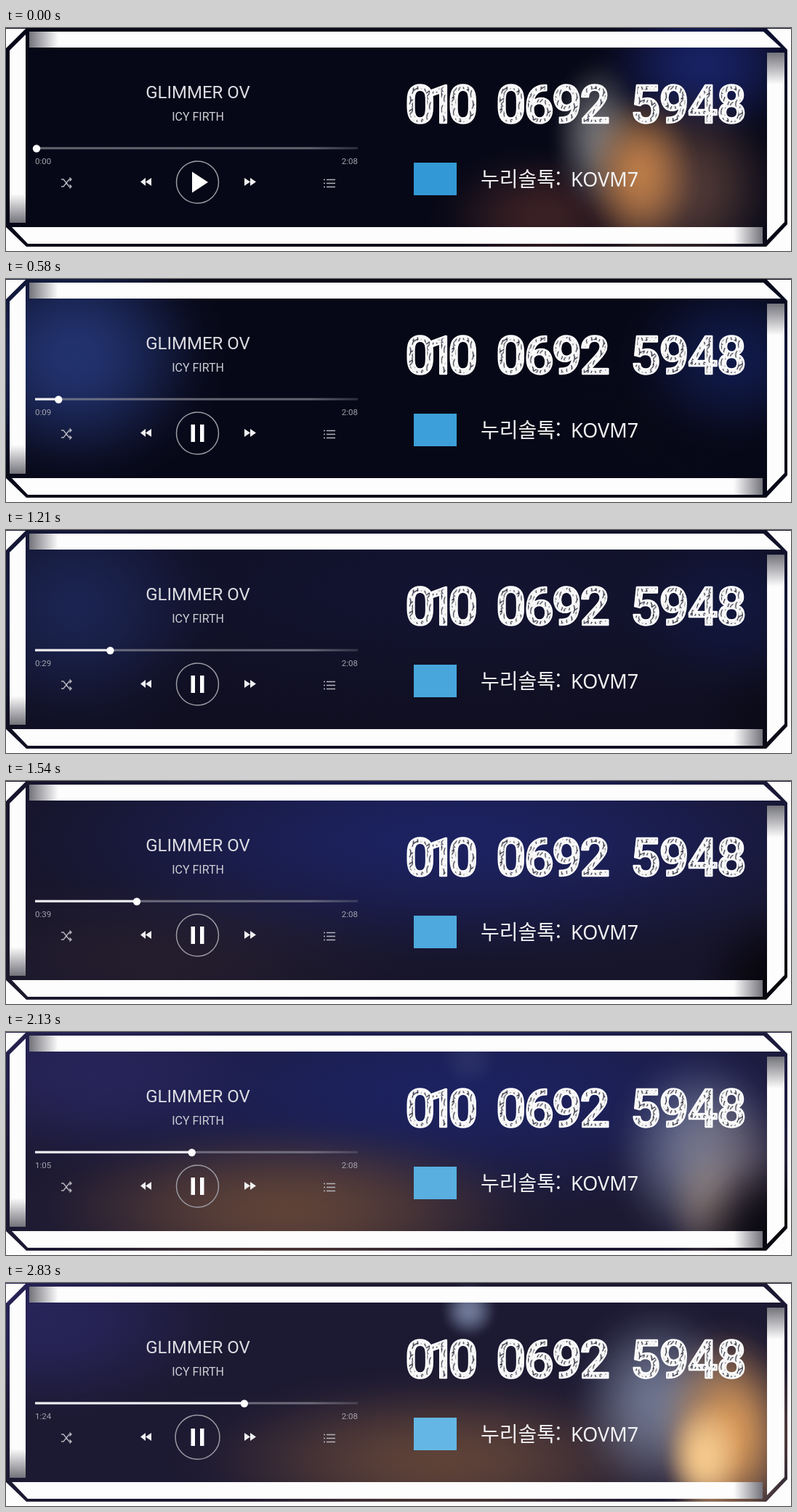
Recreate the animation shown at these times as an HTML page with a canvas. Size 1080 by 308 pixels, loop 2870 ms.

```html
<!DOCTYPE html>
<html lang="ko">
<head>
<meta charset="utf-8">
<title>Player banner</title>
<style>
  html, body { margin: 0; width: 100%; height: 100%; overflow: hidden; background: #fdfdfd; }
  canvas, svg { position: absolute; left: 0; top: 0; width: 1080px; height: 308px; }
  text { font-family: Roboto, sans-serif; }
  .title { font-size: 24px; fill: #dcdce2; text-anchor: middle; }
  .sub { font-size: 16px; fill: #cfcfd6; text-anchor: middle; }
  .time { font-size: 11.5px; fill: #a3a3ad; }
  .phone { font: 500 73px Roboto, sans-serif; fill: url(#scribble);
           stroke: #fff; stroke-width: 2.5; stroke-linejoin: round; }
  .contact { font: 500 28px "Noto Sans CJK KR", "Noto Sans CJK JP", "Noto Sans CJK", sans-serif; fill: #f2f2f4; }
  .handle { font: 500 27px "Noto Sans", sans-serif; fill: #f2f2f4; }
  .icon { fill: none; stroke: #b4b4bc; stroke-width: 1.4; }
</style>
</head>
<body>
<canvas id="glow" width="1080" height="308"></canvas>
<svg viewBox="0 0 1080 308">
  <defs>
    <pattern id="scribble" width="17" height="15" patternUnits="userSpaceOnUse" patternTransform="rotate(14)">
      <rect width="17" height="15" fill="#f6f6f6"/>
      <path d="M1 2Q5 6 3 13M7 0Q11 5 8 9T10 15M14 3Q12 8 15 13M4 8L9 3" fill="none" stroke="#1a1b2c" stroke-width="1.1"/>
    </pattern>
    <linearGradient id="toRight"><stop stop-color="#50505a" stop-opacity=".8"/><stop offset="1" stop-color="#50505a" stop-opacity="0"/></linearGradient>
    <linearGradient id="toLeft" href="#toRight" x1="1" x2="0"/>
    <linearGradient id="toDown" href="#toRight" x1="0" y1="0" x2="0" y2="1"/>
    <linearGradient id="toUp" href="#toRight" x1="0" y1="1" x2="0" y2="0"/>
    <linearGradient id="track"><stop offset=".85" stop-color="#8c8c98"/><stop offset="1" stop-color="#8c8c98" stop-opacity=".4"/></linearGradient>
  </defs>

  <!-- bevelled frame: the moving backdrop shows in the gaps -->
  <g fill="#fdfdfd">
    <path d="M0 1H27L0 28ZM1047 1H1080V308H0V275L28 302H1046L1075 271V30Z"/>
    <path d="M32 5H1042L1066 27H32Z"/>
    <path d="M1047 34H1071V268L1047 293Z"/>
    <path d="M8 275H1041V298H30Z"/>
    <path d="M5 31L27 9V269H5Z"/>
  </g>
  <rect x="32" y="5" width="40" height="22" fill="url(#toRight)"/>
  <rect x="1047" y="34" width="24" height="44" fill="url(#toDown)"/>
  <rect x="1001" y="275" width="40" height="23" fill="url(#toLeft)"/>
  <rect x="5" y="229" width="22" height="40" fill="url(#toUp)"/>

  <text class="title" x="264" y="97">GLIMMER OV</text>
  <text class="sub" x="264" y="127.500">ICY FIRTH</text>

  <rect x="40" y="164.500" width="444" height="3" fill="url(#track)" opacity=".7"/>
  <rect id="played" x="40" y="164.500" height="3" fill="#f0f0f4"/>
  <circle id="knob" cy="166.500" r="5.200" fill="#fff"/>
  <text class="time" id="clock" x="40" y="188">0:00</text>
  <text class="time" x="484" y="188" text-anchor="end">2:08</text>

  <path class="icon" d="M76 209H79L87 219H90M76 219H79L87 209H90M87.500 206.500L90 209L87.500 211.500M87.500 216.500L90 219L87.500 221.500"/>
  <path fill="#f0f0f2" d="M192 207V218L185 212.500ZM200 207V218L192 212.500ZM328 207V218L336 212.500ZM336 207V218L344 212.500Z"/>
  <path class="icon" d="M437 209.500H439M441 209.500H453M437 214.500H439M441 214.500H453M437 219.500H439M441 219.500H453"/>
  <circle id="ring" cx="263.500" cy="213" fill="none" stroke="#9a9aa2" stroke-width="1.5"/>
  <path id="play" fill="#fff" d="M256 198.500V227.500L278 213Z"/>
  <path id="pause" fill="#fff" d="M254.500 201H260V225H254.500ZM267 201H272.500V225H267Z"/>

  <g class="phone">
    <text class="phone" x="549" y="130.500" letter-spacing="-12">010</text>
    <text class="phone" x="674" y="130.500" letter-spacing="-3">0692</text>
    <text class="phone" x="859" y="130.500" letter-spacing="-2">5948</text>
  </g>
  <rect id="badge" x="561" y="186" width="59" height="45"/>
  <text class="contact" x="653" y="219">누리솔톡:</text>
  <text class="handle" x="777" y="218.500">KOVM7</text>
</svg>
<script>
const LOOP = 2870, FRAMES = 69, STEP = LOOP / FRAMES;
const PRESS = 330, END = 2830;
const $ = id => document.getElementById(id);
const ctx = $('glow').getContext('2d');

// Each scene swells around its peak; lights are colour, x, y, rx, ry
const scenes = [
  { peak: 0, span: 600, drift: 0, lights: [
    ['#182162', 960, 50, 160, 120],
    ['#3a2024', 740, 260, 160, 100],
    ['#523a36', 930, 220, 150, 150],
    ['#6a6a70', 815, 150, 70, 115],
    ['#b87a48', 872, 202, 85, 120]] },
  { peak: 780, span: 750, drift: 0, lights: [
    ['#22326e', 95, 105, 210, 190],
    ['#101a48', 1000, 110, 160, 130]] },
  { peak: 1800, span: 800, drift: 0, lights: [
    ['#1c2260', 620, 80, 680, 190]] },
  { peak: 2400, span: 1100, drift: .3, lights: [
    ['#5e4238', 470, 245, 380, 130]] },
  { peak: 2480, span: 680, drift: -.08, lights: [
    ['#2c2868', 80, 50, 280, 150],
    ['#8c96b0', 925, 165, 130, 150]] },
  { peak: END, span: 900, drift: 0, lights: [
    ['#d8995a', 995, 210, 110, 165],
    ['#f4c88c', 962, 240, 60, 85],
    ['#6e7896', 637, 38, 42, 42]] },
  { peak: 1750, span: 900, drift: 0, lights: [
    ['#07060c', 1065, 280, 130, 120]] }
];

// time, knob x, seconds shown
const progress = [[PRESS, 42, 0], [830, 102, 18], [1830, 212, 47], [2130, 257, 66], [END, 328, 84]];

const clamp = v => Math.min(1, Math.max(0, v));
const mix = (a, b, k) => a + (b - a) * k;
const rgb = hex => [1, 3, 5].map(i => parseInt(hex.slice(i, i + 2), 16));
const blend = (a, b, k) => `rgb(${rgb(a).map((v, i) => Math.round(mix(v, rgb(b)[i], k)))})`;
const pulse = (t, peak) => Math.exp(-(((t - peak) / 70) ** 2));

function swell(t, { peak, span }) {
  const k = clamp(Math.abs(t - peak) / span);
  return clamp(1.5 * Math.cos(k * Math.PI / 2) ** 2);
}

function light([color, x, y, rx, ry], strength) {
  const g = ctx.createRadialGradient(0, 0, 0, 0, 0, 1);
  for (let s = 0; s <= 1; s += .125) {
    g.addColorStop(s, `rgba(${rgb(color)},${strength * (1 - s * s) ** 2})`);
  }
  ctx.save();
  ctx.translate(x, y);
  ctx.scale(rx, ry);
  ctx.fillStyle = g;
  ctx.fillRect(-1, -1, 2, 2);
  ctx.restore();
}

function backdrop(t) {
  ctx.fillStyle = blend('#070817', '#1c1932', clamp((t - 800) / 1000));
  ctx.fillRect(0, 0, 1080, 308);
  for (const scene of scenes) {
    const strength = swell(t, scene);
    const shift = scene.drift * (t - scene.peak);
    for (const [color, x, ...rest] of scene.lights) light([color, x + shift, ...rest], strength);
  }
}

function playhead(t) {
  const i = Math.max(1, progress.findIndex(p => p[0] >= t));
  const [a, b] = [progress[i - 1], progress[i]];
  const k = clamp((t - a[0]) / (b[0] - a[0]));
  return [mix(a[1], b[1], k), Math.round(mix(a[2], b[2], k))];
}

function draw(t) {
  backdrop(t);
  const [x, s] = playhead(t);
  $('knob').setAttribute('cx', x);
  $('played').setAttribute('width', x - 40);
  $('clock').textContent = `${Math.floor(s / 60)}:${String(s % 60).padStart(2, '0')}`;
  $('ring').setAttribute('r', 29 + 2 * pulse(t, PRESS) + 1.5 * pulse(t, END));
  $('badge').setAttribute('fill', blend('#3399d6', '#64b7e4', t / END));
  const playing = t > PRESS + 70;
  $('play').style.display = playing ? 'none' : '';
  $('pause').style.display = playing ? '' : 'none';
}

const start = performance.now();
function tick(now) {
  const t = Math.max(0, now - start) % LOOP;
  const frame = Math.min(FRAMES - 1, Math.floor(t / STEP + .1));
  draw(Math.min(END, frame * STEP));
  requestAnimationFrame(tick);
}
tick(start);
</script>
</body>
</html>
```
